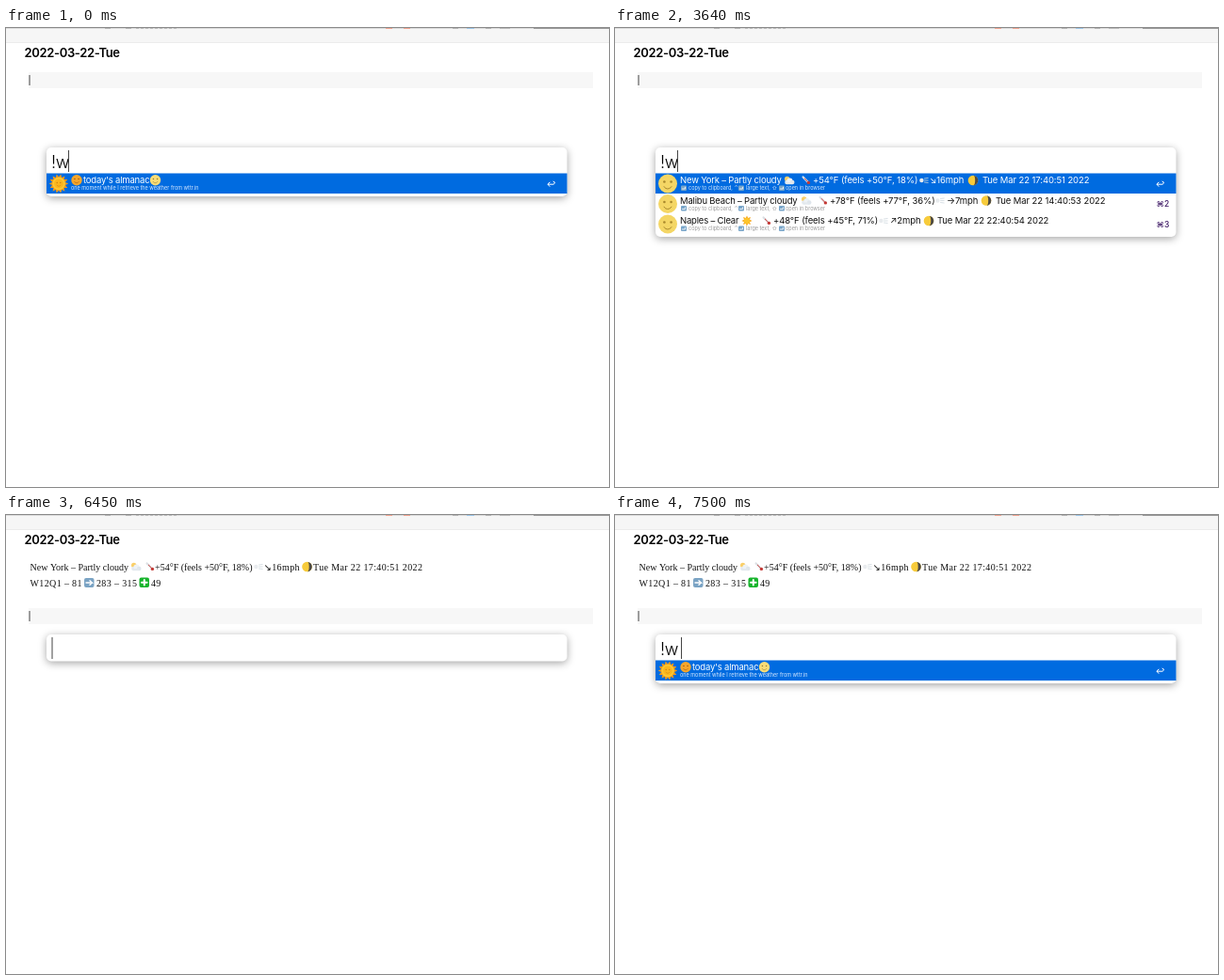
Animation, 640 px wide and 488 px high, one loop 8000 ms. Source, as an HTML page with a canvas:

```html
<!DOCTYPE html>
<html lang="en">
<head>
<meta charset="utf-8">
<title>Launcher almanac</title>
<style>
html, body { margin: 0; width: 100%; height: 100%; overflow: hidden; background: #fff; }
canvas { display: block; width: 640px; height: 488px; }
</style>
</head>
<body>
<canvas id="stage" width="640" height="488"></canvas>
<script>
const c = document.getElementById('stage').getContext('2d');
const LOOP = 8000, ROW_TOP = 154.5, ROW_H = 21.5, BLUE = '#006be0';
const SANS = 'Inter, "DejaVu Sans", sans-serif';
const SERIF = '"Liberation Serif", "DejaVu Sans", serif';
const TITLE = `9.5px ${SANS}`, SMALL = `5.5px ${SANS}`, NOTE = `10px ${SERIF}`;

// Moments at which the editor caret switches between shown and hidden
const BLINKS = [550, 1050, 1730, 2180, 3140, 3590, 4230, 5090, 5860, 6450, 6900, 7450];
// Launcher caret fades: start, end, final opacity
const FADES = [[50, 180, 0], [1050, 1320, 1], [2180, 2360, 0], [3140, 3450, 1],
  [6180, 6180, 1], [7140, 7140, 0], [7450, 7500, 1]];

const WEATHER = [
  { place: 'New York – Partly cloudy', sky: cloud, x: [185, 203, 210, 328, 334, 380, 390],
    temp: '+54°F (feels +50°F, 18%)', wind: '↘16mph', date: 'Tue Mar 22 17:40:51 2022' },
  { place: 'Malibu Beach – Partly cloudy', sky: cloud, x: [203, 221, 228, 345, 352, 394, 404],
    temp: '+78°F (feels +77°F, 36%)', wind: '→7mph', date: 'Tue Mar 22 14:40:53 2022' },
  { place: 'Naples – Clear', sky: smallSun, x: [140, 161, 168, 285, 292, 333, 342],
    temp: '+48°F (feels +45°F, 71%)', wind: '↗2mph', date: 'Tue Mar 22 22:40:54 2022' }
];
const DRIVE = '~/OneDrive - Regeneron Pharmaceuticals, Inc/';
const FILES = [
  ['Getting started! Monday, March 2, 2020.png', 'DomenicoNotes/s_images/'],
  ['Holt et al. 2016 - Present Yourself! By MHC Class I and MHC Class II Molecules.pdf',
    'Paperpile library/Paperpile 7/Other/'],
  ['Weekly notes.pdf', 'Notes/'],
  ['Reading list.pdf', 'Notes/'],
  ['Meeting summary.pdf', 'Notes/'],
  ['Figure draft.png', 'Images/'],
  ['Project outline.pdf', 'Notes/'],
  ['Overview.png', 'Images/']
];

function rect(color, x, y, w, h) {
  c.fillStyle = color;
  c.fillRect(x, y, w, h);
}
function round(color, x, y, w, h, r) {
  c.fillStyle = color;
  c.beginPath();
  c.roundRect(x, y, w, h, r);
  c.fill();
}
function disc(color, x, y, r) {
  c.fillStyle = color;
  c.beginPath();
  c.arc(x, y, r, 0, 7);
  c.fill();
}
function stroke(color, width, ...points) {
  c.strokeStyle = color;
  c.lineWidth = width;
  c.lineCap = 'round';
  c.beginPath();
  points.forEach(([x, y]) => c.lineTo(x, y));
  c.stroke();
}
function text(s, x, y, font, color = '#111', gap = 0) {
  c.font = font;
  c.letterSpacing = gap + 'px';
  c.fillStyle = color;
  c.fillText(s, x, y);
}
const title = (s, x, y, color) => text(s, x, y, TITLE, color, -0.19);
const reading = (s, x, y, color) => text(s, x, y, TITLE, color, -0.1);

// Small pictures, all placed by their centre
function face(x, y, r, fill, ink) {
  disc(fill, x, y, r);
  for (const side of [-1, 1]) disc(ink, x + side * r * .36, y - r * .2, r * .13);
  c.strokeStyle = ink;
  c.lineWidth = r * .1;
  c.beginPath();
  c.arc(x, y + r * .1, r * .45, .5, 2.64);
  c.stroke();
}
function rays(color, x, y, outer, inner, n) {
  c.fillStyle = color;
  c.beginPath();
  for (let i = 0; i < n * 2; i++) {
    const r = i % 2 ? inner : outer, a = i * Math.PI / n;
    c.lineTo(x + r * Math.cos(a), y + r * Math.sin(a));
  }
  c.fill();
}
function bigSun(x, y) {
  rays('#f19a1c', x, y, 10.3, 7.2, 14);
  disc('#fbc832', x, y, 6.8);
  face(x, y, 5, '#fbb61e', '#c87912');
}
function smallSun(x, y) {
  rays('#f7a81f', x, y, 5.6, 3.2, 8);
  disc('#fdc42c', x, y, 3.2);
}
function cloud(x, y) {
  disc('#f9cf6a', x - 2.3, y - 1.6, 2.7);
  disc('#e3e9ee', x - 2.5, y + 2, 2.3);
  disc('#eef2f5', x + .5, y + .6, 3);
  disc('#dfe6ec', x + 3.2, y + 2, 2.3);
  rect('#e3e9ee', x - 2.5, y + 2, 5.7, 2.2);
}
function thermometer(x, y) {
  stroke('#dcdfe3', 2.2, [x - 3.4, y - 3.6], [x + 1.5, y + 1.5]);
  stroke('#d0504c', 1, [x - 1.8, y - 2], [x + 2, y + 2]);
  disc('#c43a36', x + 2.4, y + 2.4, 1.7);
}
function breeze(x, y) {
  disc('#e8ebee', x - 2.6, y, 2.2);
  for (const d of [-2.5, 0, 2.5])
    stroke('#d0d8df', .8, [x + .4, y + d * .8], [x + 4.2, y + d]);
}
function moon(x, y) {
  disc('#f7cb3b', x, y, 5.3);
  c.fillStyle = '#4d4a45';
  c.beginPath();
  c.arc(x, y, 5.3, -Math.PI / 2, Math.PI / 2);
  c.ellipse(x, y, 2.2, 5.3, 0, Math.PI / 2, -Math.PI / 2, true);
  c.fill();
}
function key(x, y) {
  round('#78a5c9', x - 3, y - 2.7, 6, 5.4, 1);
  stroke('#fff', .8, [x + 1.4, y - 1.2], [x + 1.4, y + .7], [x - 1.5, y + .7]);
}
function page(x, y) {
  round('#c9c9c9', x - 6, y - 9, 12.5, 19, 1);
  rect('#fafafa', x - 5.5, y - 8.5, 11.5, 18);
  rect('#b7cbdc', x - 4, y - 4.5, 8.5, 3.5);
  rect('#2c5c86', x - 4, y - 1, 8.5, 4);
  rect('#bbb', x - 3, y + 6, 6.5, 1.3);
}
function returnArrow(x, y) {
  stroke('#fff', 1, [x - 2, y - 2.2], [x - 4, y], [x - 2, y + 2.2]);
  stroke('#fff', 1, [x - 4, y], [x + 2, y], [x + 3.3, y - 1], [x + 3.3, y - 2.3], [x + 2, y - 3]);
}

function almanacRow(y) {
  bigSun(56, y + 11);
  face(75, y + 7.2, 5.7, '#f6a62b', '#9a5710');
  title("today's almanac", 82, y + 10.7, '#fff');
  face(158.5, y + 7.2, 5.7, '#f8dc77', '#977c2d');
  text('one moment while I retrieve the weather from wttr.in', 69, y + 17.6, SMALL, '#dbeaff');
}
function weatherRow(y, w, selected) {
  const ink = selected ? '#fff' : '#111', faint = selected ? '#d5e6fb' : '#9a9a9a';
  const [sky, therm, temp, wind, speed, phase, date] = w.x;
  const base = y + 10.7, mid = y + 7.5;
  face(56, y + 11, 10, '#f4d665', '#a8882c');
  title(w.place, 69, base, ink);
  w.sky(sky, mid);
  thermometer(therm, mid);
  reading(w.temp, temp, base, ink);
  breeze(wind, mid);
  reading(w.wind, speed, base, ink);
  moon(phase, mid);
  reading(w.date, date, base, ink);
  [73, 134, 177].forEach(x => key(x, y + 15.8));
  text('copy to clipboard, ⌃', 78, y + 17.6, SMALL, faint);
  text('large text, ⇧', 139, y + 17.6, SMALL, faint);
  text('open in browser', 181, y + 17.6, SMALL, faint);
}
function fileRow(y, [name, folder]) {
  page(56, y + 11);
  title(name, 69, y + 10.7);
  text(DRIVE + folder + name, 69, y + 17.6, SMALL, '#a0a0a0');
}

function launcher(query, count, weather, caretX, caretAlpha) {
  const bottom = count ? ROW_TOP + ROW_H * count + 3 : 155.5;
  c.save();
  c.shadowColor = 'rgba(0,0,0,.36)';
  c.shadowBlur = 9;
  c.shadowOffsetY = 2;
  round('#fff', 43, 127, 552.5, bottom - 127, 5);
  c.restore();
  text(query, 48, 148.5, `300 18px ${SANS}`, '#000', -.3);
  for (let i = 0; i < count; i++) {
    const y = ROW_TOP + i * ROW_H;
    if (!i) {
      rect(BLUE, 43, y, 552.5, ROW_H);
      returnArrow(579, y + 11.7);
    } else text('⌘' + (i + 1), 574.5, y + 14.2, `500 8.5px ${SANS}`, '#3f1a66');
    if (weather) weatherRow(y, WEATHER[i], !i);
    else if (!i) almanacRow(y);
    else fileRow(y, FILES[i - 1]);
  }
  c.globalAlpha = caretAlpha;
  rect('#444', caretX, 130, 1, 23);
  c.globalAlpha = 1;
}

function topBar() {
  rect('#f6f6f6', 0, 0, 640, 15);
  rect('#ebebeb', 0, 15, 640, 1);
  rect('#dcdcdc', 0, 0, 560, 1);
  rect('#999', 560, 0, 80, 1);
  for (const x of [105, 127, 474, 509]) rect('#b4b4b4', x, 0, 6, 1);
  for (let x = 138; x < 181; x += 5) rect('#bbb', x, 0, 3, 1);
  for (const x of [403, 422]) rect('#f0a390', x, 0, 7, 1);
  rect('#9cc6e8', 489, 0, 8, 1);
  rect('#bbb', 524, 0, 11, 1);
}
function notes(t) {
  const spaced = (s, x, y) => text(s, x, y, NOTE, '#111', .37);
  if (t >= 4230) {
    text('New York – Partly cloudy', 25.5, 59, NOTE);
    cloud(138, 55);
    thermometer(153, 55);
    text('+54°F (feels +50°F, 18%)', 158, 59, NOTE);
    breeze(268, 55);
    spaced('↘16mph', 273.5, 59);
    moon(319.5, 55);
    spaced('Tue Mar 22 17:40:51 2022', 326, 59);
  }
  if (t >= 4300) {
    spaced('W12Q1 – 81', 25.5, 76);
    round('#7aa3c4', 83, 67, 10.5, 10, 2);
    stroke('#fff', 1.4, [85, 72], [91.3, 72], [89, 69.8]);
    stroke('#fff', 1.4, [91.3, 72], [89, 74.2]);
    spaced('283 – 315', 96, 76);
    round('#17b42c', 141.5, 66.5, 10.5, 10.5, 2);
    stroke('#fff', 2, [144, 71.8], [149.6, 71.8]);
    stroke('#fff', 2, [146.8, 69], [146.8, 74.6]);
    spaced('49', 154, 76);
  }
}
function queryCaret(t) {
  let alpha = 1;
  for (const [from, to, goal] of FADES) {
    if (t < from) break;
    const k = to > from ? Math.min(1, (t - from) / (to - from)) : 1;
    alpha += (goal - alpha) * k;
  }
  return alpha;
}

function draw(t) {
  rect('#fff', 0, 0, 640, 488);
  topBar();
  text('2022-03-22-Tue', 19.5, 31.3, `600 13px ${SANS}`, '#000', -.35);

  const lineY = t < 4230 ? 47 : t < 4300 ? 65 : t < 5230 ? 82 : 99;
  rect('#f7f7f7', 24, lineY, 599, 17);
  notes(t);
  if (BLINKS.filter(b => b <= t).length % 2 === 0)
    rect('#444', 24.5, lineY + 3, 1, 11);

  const caret = queryCaret(t);
  if (t < 2950) launcher('!w', 1, false, 66, caret);
  else if (t < 4050) launcher('!w', 3, true, 66, caret);
  else if (t >= 6180) {
    if (t < 6530) launcher('', 0, false, 48.5, caret);
    else if (t < 6680) launcher('!', 9, false, 53, caret);
    else if (t < 6770) launcher('!w', 3, false, 66, caret);
    else launcher(t < 7450 ? '!w' : '!w ', 1, false, t < 7450 ? 66 : 70, caret);
  }
}

function tick() {
  draw(performance.now() % LOOP);
  requestAnimationFrame(tick);
}
tick();
</script>
</body>
</html>
```
